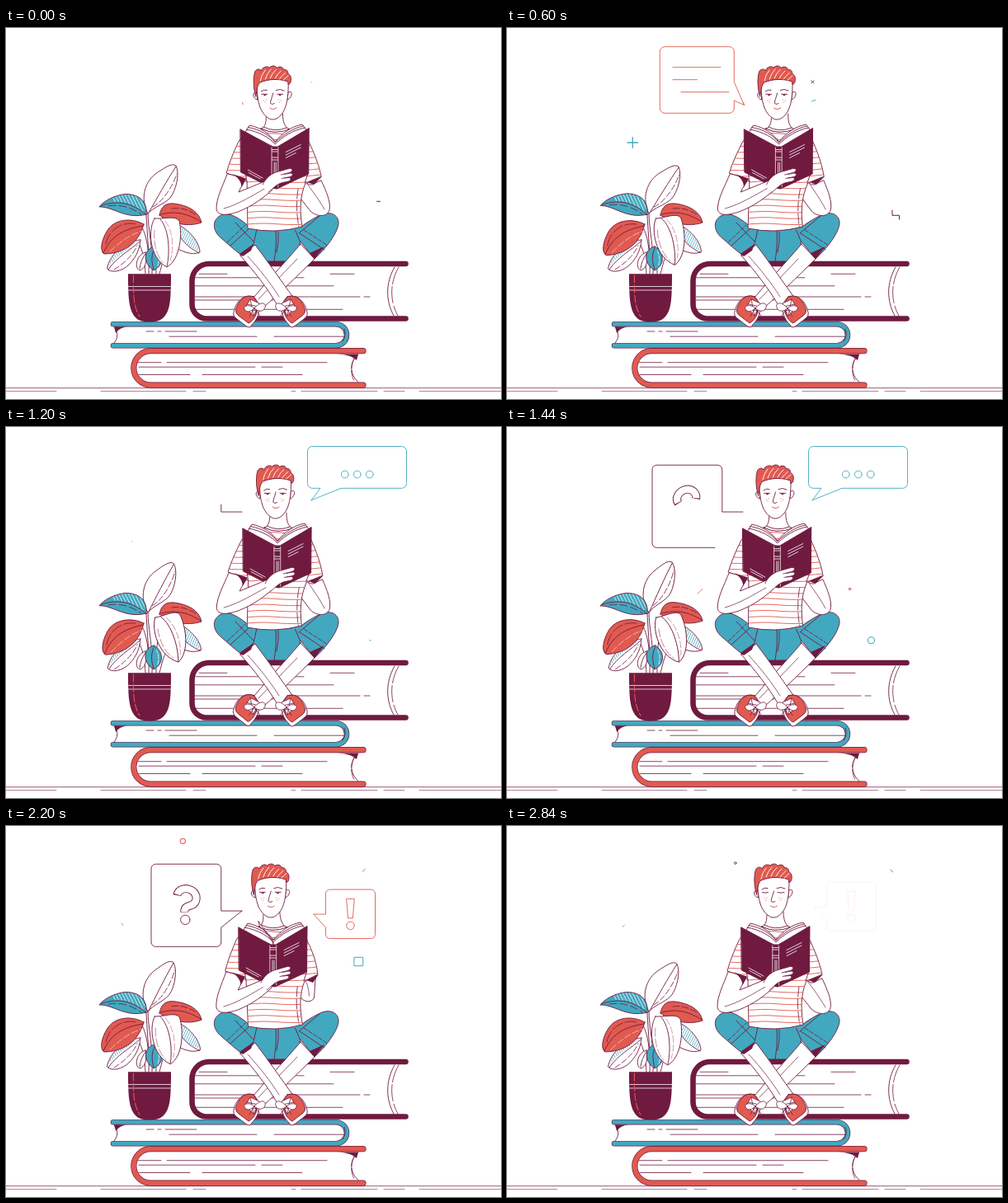
An HTML page with a canvas that plays this animation: 600x450 px, repeating every 2.88 s.

```html
<!DOCTYPE html>
<html lang="en">
<head>
<meta charset="utf-8">
<title>Reader on a stack of books</title>
<style>
html, body { margin: 0; width: 100%; height: 100%; overflow: hidden; background: #fff; }
canvas { display: block; width: 600px; height: 450px; }
</style>
</head>
<body>
<canvas id="stage"></canvas>
<script>
const DARK = '#701a40', RED = '#e15a50', TEAL = '#42a8bf', WHITE = '#fff';
const LOOP = 2880;
const canvas = document.getElementById('stage');
const ctx = canvas.getContext('2d');
const ratio = window.devicePixelRatio || 1;
canvas.width = 600 * ratio;
canvas.height = 450 * ratio;

// Timing helpers
const clamp = v => Math.max(0, Math.min(1, v));
const span = (t, start, length) => clamp((t - start) / length);
const ease = u => u < 0.5 ? 2 * u * u : 1 - 2 * (1 - u) * (1 - u);
const bump = (t, start, end) => Math.sin(Math.PI * span(t, start, end - start));
const mix = (a, b, u) => a + (b - a) * u;
const KEYS = [0, 600, 920, 1440, 1760, 2200];

// Smooth cyclic curve through one value per key time
function curve(t, values) {
  const n = KEYS.length;
  const time = i => KEYS[(i + n) % n] + LOOP * Math.floor(i / n);
  const value = i => values[(i + n) % n];
  let i = n - 1;
  while (KEYS[i] > t) i--;
  const slope = j => (value(j + 1) - value(j - 1)) / (time(j + 1) - time(j - 1));
  const h = time(i + 1) - time(i), u = (t - time(i)) / h;
  const u2 = u * u, u3 = u2 * u;
  return (2 * u3 - 3 * u2 + 1) * value(i) + (u3 - 2 * u2 + u) * h * slope(i)
    + (3 * u2 - 2 * u3) * value(i + 1) + (u3 - u2) * h * slope(i + 1);
}

// Drawing helpers
function shape(d, fill, stroke = DARK, width = 0.9) {
  const p = new Path2D(d);
  if (fill) { ctx.fillStyle = fill; ctx.fill(p); }
  if (stroke) { ctx.strokeStyle = stroke; ctx.lineWidth = width; ctx.stroke(p); }
}
const line = (d, color = DARK, width = 0.9) => shape(d, null, color, width);
function dashed(d, color, dash = [7, 3], width = 0.8) {
  ctx.setLineDash(dash);
  line(d, color, width);
  ctx.setLineDash([]);
}
function trimmed(d, length, u, color, width = 0.9) {
  if (u <= 0) return;
  if (u < 1) ctx.setLineDash([length * u, length * 2]);
  line(d, color, width);
  ctx.setLineDash([]);
}
function ring(x, y, r, color, width = 0.9) {
  if (r <= 0.05) return;
  ctx.beginPath();
  ctx.arc(x, y, r, 0, Math.PI * 2);
  ctx.strokeStyle = color;
  ctx.lineWidth = width;
  ctx.stroke();
}
function dot(x, y, r, color, from = 0, to = Math.PI * 2) {
  ctx.beginPath();
  ctx.arc(x, y, r, from, to);
  ctx.fillStyle = color;
  ctx.fill();
}
function group(draw) {
  ctx.save();
  draw();
  ctx.restore();
}
function turn(x, y, degrees) {
  ctx.translate(x, y);
  ctx.rotate(degrees * Math.PI / 180);
  ctx.translate(-x, -y);
}
function rows(list, color = DARK) {
  for (const [y, ...xs] of list)
    for (let i = 0; i < xs.length; i += 2) line(`M${xs[i]} ${y}H${xs[i + 1]}`, color, 0.8);
}
function hatch(d, color, dx, dy, step, x0, y0, x1) {
  group(() => {
    ctx.clip(new Path2D(d));
    for (let x = x0; x < x1; x += step) line(`M${x} ${y0}l${dx} ${dy}`, color, 0.8);
  });
}

function ground() {
  line('M0 436.7H600', '#8d476a', 0.9);
  rows([[440.6, 0, 61, 115, 218, 227, 242, 346, 351, 358, 450, 458, 483, 501, 600]], '#9b5c7b');
}

function cover(d, color, width) {
  if (color !== DARK) line(d, DARK, width + 0.8);
  line(d, color, width - 0.6);
}

function books() {
  shape('M170 392H424C416 405 416 420 424 432H172C148 425 148 398 170 392Z', WHITE, null);
  cover('M433 391.7H175.5A20.7 20.7 0 0 0 175.5 433.1H433', RED, 6.4);
  shape('M401 395.5H427L425 403C418 397 410 396 401 395.5Z', DARK, null);
  line('M427 396C416 405 416 420 427 429.5');
  dashed('M422 401C417 410 418 422 423 429.5', DARK, [12, 3]);
  rows([[405.7, 160, 188, 195, 389], [411.2, 161, 302, 310, 335], [420.5, 161, 223, 238, 359]]);

  cover('M130 359.2H400A13 13 0 0 1 400 385.2H130', TEAL, 5.8);
  shape('M131 362.3H148C141 363 137 365 133 370Z', DARK, null);
  line('M131.5 363C136 370 136 376 131 382M410 365Q413 373 408 380');
  rows([[368, 170, 179, 184, 188, 193, 231], [374.2, 198, 304, 325, 409]]);

  shape('M240 286H472C460 305 460 333 472 352H240C222 345 222 294 240 286Z', WHITE, null);
  line('M471 290C460 309 460 331 470 349');
  dashed('M476 290C465 309 465 331 475 349', DARK, [22, 3, 20, 4]);
  cover('M484.5 286H246A20.5 20.5 0 0 0 225.5 306.5V335A17.5 17.5 0 0 0 243 352.5H484.5', DARK, 7.2);
  rows([[298.3, 234, 268, 393, 422], [302.8, 229, 361], [312.8, 229, 397],
    [326, 229, 429, 434, 441], [330, 229, 324], [341.3, 229, 408]]);
}

function leaf(x, y, angle, outline, fill, rib, extra) {
  group(() => {
    turn(x, y, angle);
    shape(outline, fill);
    if (extra) extra();
    line(rib);
  });
}

function plant(t) {
  line('M173 298C174 270 170 250 164 240M177 298C179 270 172 245 172 224M182 298C181 268 186 240 191 226' +
    'M169 298C168 285 167 270 160 260M186 298C190 285 190 276 199 268M174 290L170 228');
  leaf(172, 226, curve(t, [0, 2, 1, -5.5, -6, -3]),
    'M172 225C162 207 168 185 184 175C192 170 201 163 206 167C211 177 206 197 199 206C190 215 179 217 172 225Z',
    WHITE, 'M173 224C182 208 195 185 206 168',
    () => dashed('M178 217C191 210 203 190 207 177', DARK));
  leaf(170, 226, curve(t, [0, 1.5, .5, 0, 0, 0]),
    'M170 227C172 210 161 201 144 201.5C131 203 118 210 113 217C129 216 145 233 170 226Z',
    TEAL, 'M115 215.5C137 208 154 213 169 226', () => {
      hatch('M169 225C169 209 160 202 144 202C135 203 126 207 121 212C139 208 156 213 169 225Z',
        WHITE, 12, 24, 4, 126, 198, 168);
      dashed('M124 216C140 213 154 219 164 226', DARK, [9, 4]);
    });
  leaf(187, 226, curve(t, [0, 0, 1, -1, -1, -1]),
    'M186 227C188 216 194 212 204 213C220 215 234 222 237 236C219 242 201 237 186 227Z',
    RED, 'M188 226C207 221 222 226 236 235',
    () => dashed('M201 219C213 217 224 222 231 227', DARK, [8, 3]));
  leaf(207, 245, curve(t, [0, -1, -2, -4, -2, -1]),
    'M207 238C221 243 235 260 235 272C224 277 211 269 204 266Z', WHITE, 'M207 247C216 263 225 268 234 273',
    () => hatch('M208 239C222 244 234 260 234 271C222 266 213 259 208 247Z', TEAL, -18, 36, 3, 211, 238, 252));
  leaf(163, 258, curve(t, [0, 0, -1, -1, -1, 0]),
    'M163 257C143 258 125 276 122.5 292C128 298 141 295 149 287C159 277 162 267 163 257Z',
    WHITE, 'M124 293C134 278 150 270 162 259', () => {
      hatch('M160 258C143 262 126 276 123 291C130 279 147 270 160 258Z', TEAL, 18, 40, 3, 108, 256, 158);
      dashed('M131 293C144 285 154 275 159 264', DARK);
    });
  leaf(168, 240, curve(t, [0, -2, -3, -2, -1, 0]),
    'M167 238C151 229 130 232 122 247C116 257 113 270 119 274C139 274 160 264 167 238Z',
    RED, 'M118 273C128 249 148 243 166 240', () => {
      dashed('M121 262C125 243 143 234 158 238', DARK, [14, 3]);
      dashed('M126 271C140 258 151 250 166 246', '#f5c5bd', [8, 3]);
    });
  leaf(168, 280, 0, 'M169 272C158 275 155 291 162 294C169 292 171 284 169 272Z', WHITE, 'M162 292Q163 282 169 274');
  leaf(179, 294, curve(t, [0, -2, -2, -1, -1, 1]),
    'M180 265C168 267 164 284 179 294C193 287 191 271 180 265Z', TEAL, 'M179 293C176 283 176 275 180 267',
    () => dashed('M184 288Q187 279 183 271', WHITE, [5, 2]));
  leaf(181, 228, curve(t, [0, -8, -13, -13, -12, -4]),
    'M180 231C172 244 173 278 195 290C211 281 214 251 210 234C206 227 190 232 180 231Z',
    WHITE, 'M187 232C198 244 199 273 195 289', () => {
      dashed('M193 234C204 249 203 271 199 282', '#c78a9b', [8, 3]);
      dashed('M180 245C178 263 184 278 190 284', '#b1738b', [10, 3]);
    });
  shape('M148 298.3H200C200 330 199 342 192 350C187 356 180 356.5 174 356.5C166 356.5 160 355 156 350C149 341 148 328 148 298.3Z', DARK, null);
  line('M148 313.5H200M148 318H200', '#eadce2', 0.9);
  dashed('M154.5 300C154 325 155 339 162 350', RED, [9, 3], 1.1);
}

function shoe() {
  shape('M341 326C353 322 362 332 364.5 343Q367 349 361 353L350 361.5Q345 365 343 360C336 353 328 338 341 326Z', WHITE);
  shape('M341 326C353 322 360 332 362.5 342Q363 346 359 349L347 358C340 356 330 338 341 326Z', RED);
  shape('M334 334L345 329L351 339L341 349Z', WHITE, DARK, 0.8);
  line('M335 338L349 335M337 343L350 340M345 329L341 349', DARK, 0.8);
  shape('M340 340C333 331 325 333 327 339C329 345 336 344 340 340ZM340 340C344 335 354 336 352 341C349 346 344 344 340 340Z', WHITE, DARK, 0.8);
  line('M340 340L333 349M340 340L346 350', DARK, 0.8);
}

function legs(t) {
  shape('M295 241L300 265L306 283H344L356 264L358 241Z', TEAL);
  line('M327 246C328 259 327 270 325 283M330 247Q331 259 328 272');
  shape('M357 262L374 280C350 304 330 323 313 338L296 332C312 312 335 288 357 262Z', WHITE);
  line('M306 329L353 280', DARK, 0.7);
  shape('M284 276L302 263C318 284 333 306 349 328L330 338C318 317 300 294 284 276Z', WHITE);
  line('M293 277C307 292 321 310 331 326', DARK, 0.7);
  shape('M295 241C281 229 269 222 259 228C248 235 252 248 261 255C270 263 278 270 286 276L300 262L304 244Z', TEAL);
  shape('M358 241C364 236 374 230 383 226C394 222 404 227 403 238C401 250 389 266 374 280L356 258L350 244Z', TEAL);
  line('M296 242L304 244M350 244L358 241', TEAL, 2);
  line('M295 241Q326 250 358 241');
  shape('M283 274L300 262L297 270L287 277Z', DARK, null);
  shape('M368 273L386 265L374 280Z', DARK, null);
  line('M278 236L300 259M272 264L294 244M355 249L380 228M356 249L386 269');
  dashed('M268 260L290 239', DARK, [5, 2]);
  dashed('M361 245L390 264', DARK, [5, 2]);
  shoe();
  group(() => {
    turn(311, 334, curve(t, [0, 0.5, 4, 0, 0, 0]));
    ctx.translate(641, 0);
    ctx.scale(-1, 1);
    shoe();
  });
}

function shear(k) {
  ctx.transform(1, 0, -k / 75, 1, 225 * k / 75, 0);
}

function shirt(lift) {
  const hemX = 382 - 3 * lift;
  const outline = `M309 122C297 125 286 129 281 139C276 150 270 164 267 176L292 186L293 243Q326 250 359 241` +
    `C356 222 356 204 363 188L${hemX} 180C378 161 370 145 365 134C359 126 350 125 342 122Q325 130 309 122Z`;
  shape(outline, WHITE);
  group(() => {
    ctx.clip(new Path2D(outline));
    for (let i = 0; i < 16; i++) {
      const y = 128 + i * 7.3;
      line(`M262 ${y}C290 ${y + 3} 300 ${y - 2} 325 ${y}S365 ${y + 1} 388 ${y - 2}`, RED, 0.9);
    }
  });
  line('M292 187L290 175M362 188L366 176');
  dashed('M354 195C351 214 353 230 355 241', DARK, [12, 3]);
  shape(`M365 187L${hemX + 1} 180L373 190Z`, DARK, null);
}

function rightArm(lift) {
  const m = (a, b) => mix(a, b, lift).toFixed(1);
  shape(`M${m(382, 377)} ${m(185, 181)}C${m(388, 375)} ${m(198, 190)} ${m(394, 375)} ${m(211, 200)} ${m(392, 374)} ${m(221, 208)}` +
    `C${m(389, 371)} ${m(230, 215)} ${m(376, 361)} ${m(229, 214)} ${m(369, 357)} ${m(222, 207)}` +
    `L${m(346, 354)} 193L358 179C363 188 367 191 ${m(371, 365)} ${m(190, 184)}Z`, WHITE);
  line(`M358 180C365 189 ${m(378, 367)} ${m(206, 190)} ${m(386, 368)} ${m(220, 206)}`, DARK, 0.7);
}

function leftArm() {
  shape('M268 177C262 193 255 206 255 219C256 229 269 227 281 223C299 216 312 206 323 196L318 184C304 190 294 194 282 199C285 192 288 188 290 183Z', WHITE);
  line('M264 219C282 214 299 203 315 194', DARK, 0.7);
  shape('M274 177L291 183L285.5 193C285 186 281 181 274 177Z', DARK, null);
}

function openBook(t) {
  shape('M290 126L295 118C309 121 319 128 326 138C334 128 346 119 359 117L364 124L328 146Z', WHITE);
  line('M291 123C307 126 319 133 326 141C335 132 347 124 362 121M293 120.5C308 123 319 130 326 139C335 130 348 121 360 119');
  const u = ease(span(t, 1880, 480));
  if (u > 0 && u < 1) {
    const x = mix(360, 293, u), y = 119 - 6 * Math.sin(Math.PI * u);
    shape(`M326 142Q${mix(342, 310, u)} ${mix(125, 130, u)} ${x} ${y}L${x + 2} ${y + 7}Q326 134 326 145Z`, WHITE, DARK, 0.8);
  }
  shape('M284 123L322 144H329L367 121.5L366.5 177L328 195L322 194L284.5 175Z', DARK, DARK, 1);
  line('M321.8 145V193M329.6 145V193', '#f3e8ed', 0.8);
  line('M322 147.5H329M322 150H329M322 157H329M322 160H329M325 163V187M327 163V187', '#f3e8ed', 0.9);
  line('M339 150.5L357 141.5M339 154L357 145M339 157.5L351 151.5M293 172L311 182M294 175.5L308 183', '#f3e8ed', 0.9);
}

function hand() {
  shape('M310 193C313 184 318 179 327 175L343 170.5C348 170 348 174 343 175.5L337 177.5L344 176C348 176 348 179 344 180.5' +
    'L337 182L343 181.5C346 182 345 185 342 186L333 188C327 190 323 195 319 199Z', WHITE, null);
  line('M311 190C314 183 319 178 327 175L343 170.5C348 170 348 174 343 175.5L333 178M337 177.5L344 176C348 176 348 179 344 180.5' +
    'L334 182.5M337 182L343 181.5C346 182 345 185 342 186L333 188C327 190 323 195 318 199', DARK, 0.8);
}

function neck() {
  shape('M315 103V115Q314 121 309 122Q325 130 342 123Q336 119 335 105Z', WHITE, null);
  line('M315 107C315 115 314 120 309 122Q325 130 343 123C338 121 335 114 335 104M312 120Q325 127 340 121');
}

function head(t) {
  shape('M304 79C298 76 298 85 304 87ZM342 78C348 74 347 85 341 87Z', WHITE);
  shape('M303.5 66C304 80 305 89 308 97C312 106 318 111 323 111C329 111 335 105 338 97C341 89 342 80 342 64Q322 56 303.5 66Z', WHITE);
  shape('M302.5 83C299.5 74 299 60 301.5 53C303 49.5 308 49 309 52C310.5 47.5 316 45.5 319 48C322 45 327 45.5 328 48.5' +
    'C331 46 336 47 336 50.5C340 50 342 52.5 341.5 55.5C345.5 57 346 62 344.5 66.5L342 69L341.5 65C330 61 317 62 308 66C304 69 304 76 302.5 83Z', RED);
  line('M308 64Q309 57 314 51M314 62Q316 55 321 50M320 61Q322 55 327 50.5M326 61Q329 55 333 52M331 62Q335 57 338 54.5M336 63Q340 60 342 57.5', '#fff3ee', 1);
  line('M309 77Q312 74 316 75.5M327 75.5Q332 73 337 76M323.5 79C322 85 319 91 321 92Q323 93 325 91.5', DARK, 0.9);
  const closed = t > 2740;
  line(closed ? 'M309.5 80.5Q313 81.8 316.5 80.5M328 80.5Q332 81.8 336 80.5' : 'M309.5 80.3H316.5M328.5 80.3H335.5', DARK, 0.9);
  if (!closed) {
    dot(313.5, 80.5, 1.7, DARK, 0, Math.PI);
    dot(331.8, 80.5, 1.7, DARK, 0, Math.PI);
  }
  for (const [x, y] of [[312, 88], [315, 87], [314, 90], [330, 87], [333, 88], [331, 90]]) dot(x, y, 0.6, RED);
  line('M319.5 97Q323 100 327.5 97', RED, 1);
}

function reader(t) {
  const sway = 1 + 3 * Math.cos(2 * Math.PI * (t - 840) / LOOP);
  const lift = ease(span(t, 1800, 320)) * (1 - ease(span(t, 2300, 380)));
  legs(t);
  group(() => { shear(sway); rightArm(lift); shirt(lift); neck(); });
  group(() => { ctx.translate(sway * 1.15, 0); head(t); });
  group(() => { ctx.translate(sway, 0); openBook(t); });
  group(() => { shear(sway); leftArm(); });
  group(() => { ctx.translate(sway, 0); hand(); });
}

// Draws content that floats up and fades once its time is over
function floating(t, start, length, rise, draw) {
  const u = span(t, start, length);
  if (u >= 1) return;
  group(() => {
    ctx.globalAlpha = 1 - Math.pow(u, 1.3);
    ctx.translate(0, -rise * Math.pow(u, 1.5));
    draw();
  });
}

function textBubble(t) {
  const wrapped = t > 2860 ? t - LOOP : t;
  floating(wrapped, 760, 420, 14.5, () => {
    trimmed('M286.5 90.5L287.5 93.5L275.3 88V97A6 6 0 0 1 269.3 103.3H191.3A6 6 0 0 1 185.3 97V29A6 6 0 0 1 191.3 22.7H269.3' +
      'A6 6 0 0 1 275.3 29V65.5L287.5 93.5', 368, ease(span(wrapped, -30, 570)), RED);
    ctx.translate(0, -3 * ease(span(t, 600, 320)));
    const slide = 10 * (1 - ease(span(t, 600, 240)));
    [[200, 0], [440, 0], [280, slide]].forEach(([start, dx], i) => {
      const w = 58 * ease(span(t, start, 320));
      if (w > 0) line(`M${201 + dx} ${47.7 + 15 * i}h${w}`, RED);
    });
  });
}

function dotsBubble(t) {
  if (t < 640) return;
  floating(t, 1500, 330, 18, () => {
    trimmed('M370 88.8L406 74.3H479.5A6 6 0 0 0 485.5 68.3V29.5A6 6 0 0 0 479.5 23.5H371.5A6 6 0 0 0 365.5 29.5V68.3' +
      'A6 6 0 0 0 371.5 74.3H381L370 88.8', 370, ease(span(t, 642, 440)), TEAL);
    const base = ctx.globalAlpha;
    for (let i = 0; i < 3; i++) {
      const u = span(t, 840 + i * 90, 170);
      ctx.globalAlpha = base * u;
      ring(mix(402, 410.8, ease(u)) + 15 * i, 57.5, 4.4, TEAL);
    }
  });
}

function questionBubble(t) {
  if (t < 1100) return;
  floating(t, 2250, 350, 18, () => {
    trimmed('M286 103H260.8V51.5A5.5 5.5 0 0 0 255.3 46.2H181.5A5.5 5.5 0 0 0 176 51.5V141A5.5 5.5 0 0 0 181.5 146.3H255.3' +
      'A5.5 5.5 0 0 0 260.8 141V123L286 103', 399, ease(span(t, 1104, 470)), DARK);
    const grow = ease(span(t, 1160, 480)) * 64;
    if (grow > 3) group(() => {
      turn(218, 88, -48 * (1 - ease(span(t, 1380, 330))) + 8 * bump(t, 1600, 1960));
      const hook = 'M207.3 84C209 75.5 219 74.5 225 78C233 83 232 93 225 96C219 98 216.3 98 216.3 104.5';
      ctx.lineCap = 'butt';
      ctx.setLineDash([grow, 200]);
      line(hook, DARK, 10);
      ctx.setLineDash([Math.min(grow, 58) - 1.8, 200]);
      ctx.lineDashOffset = -0.9;
      line(hook, WHITE, 8.2);
    });
    ring(217.3, 113.8, 5.7 * ease(span(t, 1820, 200)), DARK);
  });
}

function exclamationBubble(t) {
  if (t < 1735) return;
  floating(t, 2460, 410, 10, () => {
    trimmed('M373 107L387.5 123V131.5A5 5 0 0 0 392.5 136.5H442.5A5 5 0 0 0 447.5 131.5V82A5 5 0 0 0 442.5 77H392.5' +
      'A5 5 0 0 0 387.5 82V107H373', 267, ease(span(t, 1735, 565)), RED);
    const u = ease(span(t, 1900, 240));
    if (u <= 0) return;
    line(`M413 88.3H422.3L${mix(422, 420.3, u)} ${88.3 + 23.5 * u}H${mix(413, 415, u)}Z`, RED);
    ring(417.5, 120.8, 4.8 * u, RED);
  });
}

function spark(x, y, angle, size, draw) {
  if (size < 0.02) return;
  group(() => {
    ctx.translate(x, y);
    ctx.rotate(angle);
    ctx.scale(size, size);
    draw();
  });
}

function sparks(t) {
  if (t < 840) spark(370.5, 65.4, 0, 0.25 + 0.8 * bump(t, 0, 1000),
    () => line('M-1.5 -1.5L1.5 1.5M-1.5 1.5L1.5 -1.5', DARK, 0.9));
  if (t > 420 && t < 760) line('M369.5 89Q371 87.5 374 87.5', TEAL, 1);
  if (t < 840) {
    const u = ease(span(t, 0, 560)), x = mix(449.5, 467, u), y = mix(210.3, 221, u);
    trimmed(`M${x} ${y}${u < 0.15 ? 'h4' : 'v6.3h8.5v4.8'}`, 20, 1 - span(t, 660, 180), DARK, 1);
  }
  spark(152.3, 139, 0.0003 * Math.max(0, t - 600), Math.min(1, 1.25 * bump(t, 260, 1240)),
    () => line('M-6.3 0H6.3M0 -6.3V6.3', TEAL, 1.3));
  if (t > 800 && t < 1160) trimmed('M236.5 171.5L230.8 177.5L235.5 182.3', 15, span(t, 800, 110), RED, 1);
  if (t > 1260 && t < 1600) line('M231 202.3L237 196.3', RED, 0.8);
  spark(415.6, 196.5, 0, bump(t, 1260, 1660), () => line('M-1.8 0H1.8M0 -1.8V1.8', '#c24a53', 0.8));
  ring(441.5, 258.8, 4 * ease(span(t, 1160, 220)) * (1 - ease(span(t, 1880, 220))), TEAL, 1.1);
  if (t > 1740 && t < 1900) line('M213.3 15.4Q215 14.8 217 16.3', DARK, 0.9);
  ring(214.3, 18.3, 3.1 * ease(span(t, 1860, 240)) * (1 - ease(span(t, 2440, 260))), RED, 1.1);
  if (t > 2100 && t < 2360) line('M432 55.5L435.3 52.5', TEAL, 1);
  spark(427.5, 164.5, 0, Math.min(1, 1.3 * bump(t, 1900, 2600)), () => line('M-5.2 -5.2H5.2V5.2H-5.2Z', TEAL, 1));
  if (t > 2120 && t < 2400) line('M139.8 118L142 120.3', RED, 0.9);
  if (t > 2640) {
    line('M140.3 122.3L142.3 120.4', RED, 0.8);
    line('M465 53L468 56', TEAL, 1);
    ring(276.8, 45, 1.3, DARK, 0.8);
  }
}

function render(t) {
  ctx.setTransform(ratio, 0, 0, ratio, 0, 0);
  ctx.fillStyle = WHITE;
  ctx.fillRect(0, 0, 600, 450);
  ctx.lineCap = ctx.lineJoin = 'round';
  ground();
  books();
  plant(t);
  textBubble(t);
  dotsBubble(t);
  questionBubble(t);
  exclamationBubble(t);
  reader(t);
  sparks(t);
}

const begin = performance.now();
function frame() {
  render((performance.now() - begin) % LOOP);
  requestAnimationFrame(frame);
}
frame();
</script>
</body>
</html>
```
